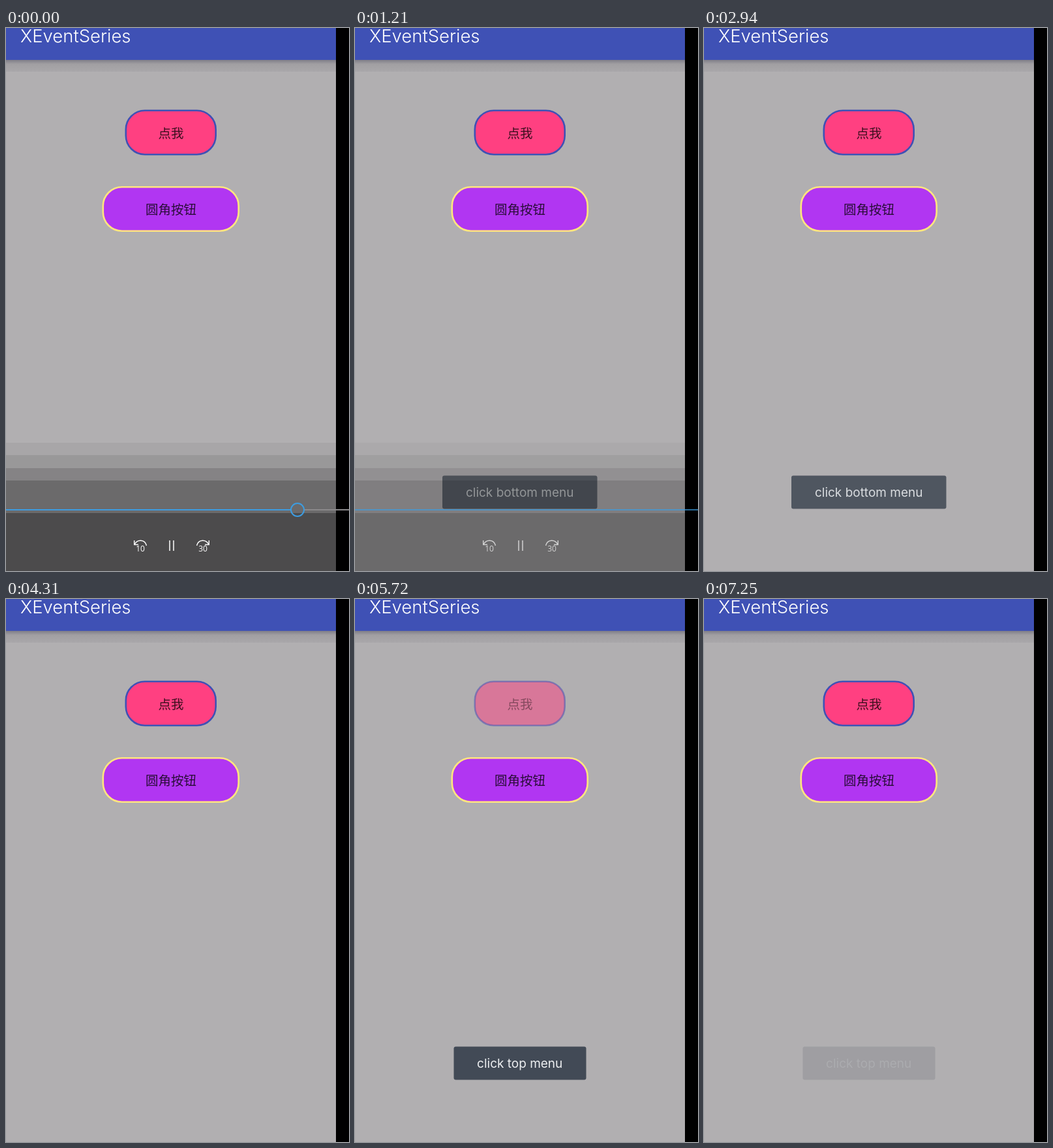
An HTML page with a canvas for the animation above (7.35 s loop, 526 by 834 pixels).

```html
<!DOCTYPE html>
<html lang="zh">
<head>
<meta charset="utf-8">
<style>
  html, body { margin: 0; width: 100%; height: 100%; overflow: hidden; background: #000; }
  canvas { display: block; }
</style>
</head>
<body>
<canvas id="stage" width="526" height="834"></canvas>
<script>
const ctx = document.getElementById('stage').getContext('2d');
const LOOP = 7350, WIDTH = 526, HEIGHT = 834, SCREEN = 506;
const LATIN = 'Inter, sans-serif';
const CJK = '"Noto Sans CJK SC", "Noto Sans CJK", sans-serif';

// Timing: 0..1 ramps and pulses built from them.
const ramp = (t, start, length) => Math.min(1, Math.max(0, (t - start) / length));
const pulse = (t, on, off, attack, decay) => ramp(t, on, attack) - ramp(t, off, decay);
const pressed = (t, down, up) => pulse(t, down, up, 120, 220);
const shown = (t, on, off) => pulse(t, on, off, 380, 420);
const sliderX = t => 447 + 22.7 * Math.floor((t + 30) / 270);

function rect(x, y, w, h, color) {
  ctx.fillStyle = color;
  ctx.fillRect(x, y, w, h);
}

function text(str, x, y, font, color, align = 'center') {
  ctx.font = font;
  ctx.textAlign = align;
  ctx.fillStyle = color;
  ctx.fillText(str, x, y);
}

function line(x1, y1, x2, y2, color, width) {
  ctx.strokeStyle = color;
  ctx.lineWidth = width;
  ctx.beginPath();
  ctx.moveTo(x1, y1);
  ctx.lineTo(x2, y2);
  ctx.stroke();
}

function drawScreen() {
  rect(0, 0, WIDTH, HEIGHT, '#000');
  rect(0, 0, SCREEN, HEIGHT, '#b1afb1');
  const shadow = ctx.createLinearGradient(0, 49, 0, 67);
  shadow.addColorStop(0, '#7e7d88');
  shadow.addColorStop(.35, '#a19fa2');
  shadow.addColorStop(1, '#a9a7aa');
  rect(0, 49, SCREEN, 18, shadow);
  rect(0, 0, SCREEN, 49, '#3f51b5');
  text('XEventSeries', 22, 22, '300 27.5px ' + LATIN, '#fff', 'left');
}

function drawButton(label, x, y, w, fill, border, press) {
  const lineWidth = 2.6;
  ctx.globalAlpha = 1 - press / 2;
  ctx.beginPath();
  ctx.roundRect(x + lineWidth / 2, y + lineWidth / 2, w - lineWidth, 70 - lineWidth, 29);
  ctx.fillStyle = fill;
  ctx.fill();
  ctx.strokeStyle = border;
  ctx.lineWidth = lineWidth;
  ctx.stroke();
  text(label, 253, y + 43, '19.5px ' + CJK, 'rgba(0,0,0,.77)');
  ctx.globalAlpha = 1;
}

function drawToast(label, x, w, alpha) {
  ctx.globalAlpha = alpha;
  ctx.beginPath();
  ctx.roundRect(x, 687.5, w, 51, 3);
  ctx.fillStyle = '#424a56';
  ctx.fill();
  text(label, 252.7, 719.5, '19px ' + LATIN, '#eef0f2');
  ctx.globalAlpha = 1;
}

// Bands that darken quadratically towards the control panel.
function drawShade() {
  const top = i => i < 4 ? 637 + 19.3 * i : 745;
  for (let i = 0; i < 5; i++) {
    const y = Math.round(top(i));
    const end = i < 4 ? Math.round(top(i + 1)) : HEIGHT;
    rect(0, y, SCREEN, end - y, `rgba(0,0,0,${.05 + .07 * i + .015 * i * i})`);
  }
}

function drawSkip(x, label, direction) {
  ctx.save();
  ctx.translate(x, 796);
  ctx.scale(direction, 1);
  ctx.strokeStyle = '#fff';
  ctx.lineWidth = 1.4;
  ctx.beginPath();
  ctx.moveTo(-9, -2.5);
  ctx.bezierCurveTo(-5, -11, 7, -11, 9.5, -1);
  ctx.moveTo(-9.3, -9);
  ctx.lineTo(-9.3, -2.5);
  ctx.lineTo(-3, -2.5);
  ctx.stroke();
  ctx.restore();
  text(label, x, 804, '12px "Open Sans", sans-serif', '#fff');
}

function drawPlayer(x, alpha) {
  ctx.globalAlpha = alpha;
  drawShade();
  line(0, 740, Math.min(WIDTH, x - 10), 740, '#3d9ce0', 2);
  if (x + 10 < WIDTH) line(x + 10, 740, WIDTH, 740, '#8b898b', 2);
  ctx.strokeStyle = '#3d9ce0';
  ctx.lineWidth = 2;
  ctx.beginPath();
  ctx.arc(x, 740, 10, 0, Math.PI * 2);
  ctx.stroke();
  drawSkip(206, '10', 1);
  line(251, 787, 251, 803, '#fff', 1.5);
  line(257, 787, 257, 803, '#fff', 1.5);
  drawSkip(302, '30', -1);
  ctx.globalAlpha = 1;
}

function draw(now) {
  const t = now % LOOP;
  drawScreen();
  drawButton('点我', 182.5, 125.5, 140.5, '#ff4081', '#3f51b5',
    pressed(t, 4540, 4820) + pressed(t, 5550, 6330));
  drawButton('圆角按钮', 147.5, 243, 210.5, '#b136f2', '#ffe57f', pressed(t, 430, 710));
  drawToast('click bottom menu', 134, 237.5, shown(t, 920, 2890));
  drawToast('click top menu', 151.5, 203, shown(t, 4850, 6900));
  drawPlayer(sliderX(t), 1 - ramp(t, 1030, 600));
  requestAnimationFrame(draw);
}
requestAnimationFrame(draw);
</script>
</body>
</html>
```
